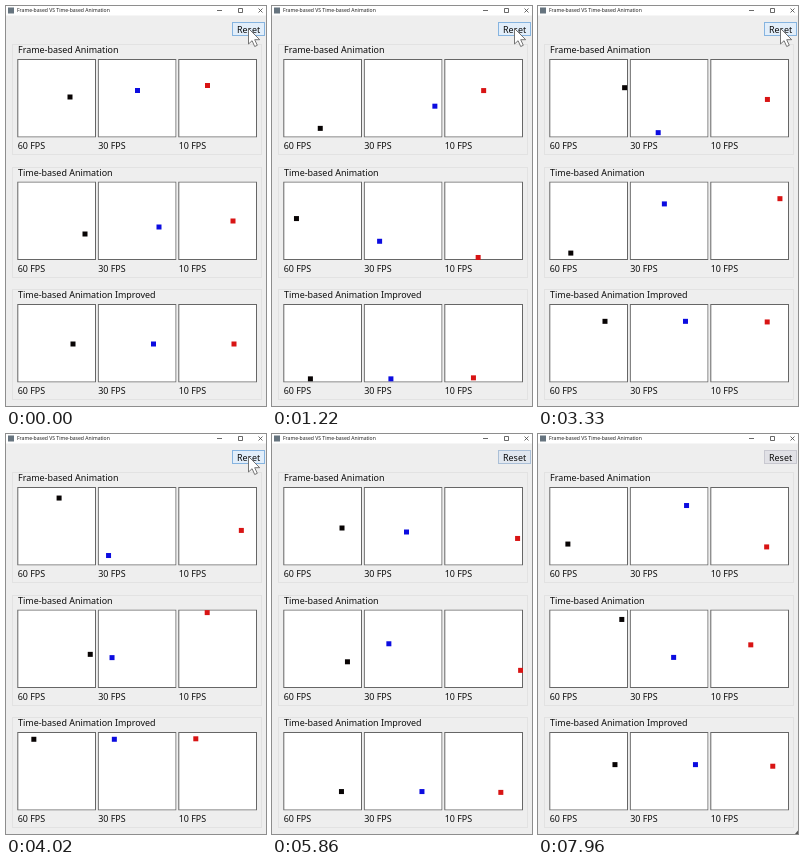
These frames come from a looping animation (260x400 px, 8 s). An HTML page:

```html
<!DOCTYPE html>
<html lang="en">
<head>
<meta charset="utf-8">
<title>Animation comparison</title>
<style>
  html, body { margin: 0; width: 100%; height: 100%; overflow: hidden; background: #eee; }
  svg { display: block; width: 260px; height: 400px; }
  text { font: 8.95px "Noto Sans", "Open Sans", sans-serif; fill: #0c0c0c; }
  .caption { font-size: 5.06px; fill: #222; }
</style>
</head>
<body>
<svg viewBox="0 0 260 400">
  <rect width="260" height="400" fill="#eee"/>
  <rect width="260" height="9.500" fill="#fff"/>
  <rect x="2" y="1.500" width="6" height="6" fill="#66747f"/>
  <text class="caption" x="11" y="6.400">Frame-based VS Time-based Animation</text>
  <path d="M211 4.500h5M232.500 2.500h4v4h-4zM252.500 2.500l4 4m0-4l-4 4" fill="none" stroke="#444" stroke-width=".8"/>
  <g id="panels"></g>
  <rect id="button" x="226.500" y="16.500" width="32" height="13"/>
  <text x="231" y="27.300">Reset</text>
  <path id="cursor" d="M242.500 22.500v15.500l3.600-3.300 2.600 5.800 2.600-1.200-2.600-5.600h5z"
        fill="#fff" stroke="#666" stroke-width=".9" stroke-linejoin="round"/>
  <path id="corner" d="M260 396.500v3.500h-3z" fill="#555"/>
</svg>
<script>
const LOOP = 8000, REFRESH = 77.25, LEAD = 20, SPAN = 73;
const RATES = [60, 30, 10], COLORS = ['#080404', '#0c0ce0', '#d81414'];

// Squares start at x, y and move at vx, vy pixels per second.
const perFrame = (x, y, fps) => ({ x, y, vx: .846 * fps, vy: .423 * fps });
const synced = { x: 52.5, y: 37.5, vx: 56.3, vy: 28.2 };
const ROWS = [
  { title: 'Frame-based Animation',
    squares: [perFrame(49.5, 35.5, 60), perFrame(36.5, 29, 30), perFrame(26, 24, 10)] },
  { title: 'Time-based Animation',
    squares: [
      { x: 64.5, y: 50, vx: 74, vy: 49.7 },
      { x: 58, y: 43, vx: 61, vy: 37 },
      { x: 51.5, y: 37, vx: 58.2, vy: 30.4, overshoot: 3 }] },
  { title: 'Time-based Animation Improved', squares: [synced, synced, synced] }
];

const byId = id => document.getElementById(id);
const clamp = v => Math.max(0, Math.min(1, v));

function add(parent, tag, attrs, text = '') {
  const el = document.createElementNS('http://www.w3.org/2000/svg', tag);
  for (const name in attrs) el.setAttribute(name, attrs[name]);
  el.textContent = text;
  return parent.appendChild(el);
}

function bounce(path, overshoot) {
  const span = SPAN + 2 * overshoot, p = (path + overshoot) % (2 * span);
  return Math.min(p, 2 * span - p) - overshoot;
}

const movers = [];
ROWS.forEach(({ title, squares }, row) => {
  const top = 53 + 122.5 * row, panel = byId('panels');
  add(panel, 'rect', { x: 6.5, y: Math.round(top) - 14.5, width: 249, height: 110, fill: 'none', stroke: '#e2e2e2' });
  add(panel, 'text', { x: 12, y: top - 5.8 }, title);
  squares.forEach((square, col) => {
    const left = 12 + 80.5 * col;
    add(panel, 'text', { x: left - .3, y: top + 90.2 }, RATES[col] + ' FPS');
    const box = add(panel, 'svg', { x: left - 1, y: top, width: 79, height: 78.5 });
    add(box, 'rect', { x: .8, y: .5, width: 77.7, height: 77.5, fill: '#fff', stroke: '#666' });
    const el = add(box, 'rect', { width: 5, height: 5, fill: COLORS[col] });
    movers.push({ el, fps: RATES[col], ...square });
  });
});

function mix(from, to, k) {
  return `rgb(${from.map((v, i) => Math.round(v + (to[i] - v) * k))})`;
}

function draw(t) {
  const now = Math.floor((t + LEAD) / REFRESH) * REFRESH;
  for (const { el, fps, x, y, vx, vy, overshoot = 0 } of movers) {
    // The slow column visibly holds between its own ticks.
    const seconds = fps === 10 ? Math.floor((now + 30) / 100) / 10 : now / 1000;
    el.setAttribute('x', 1 + bounce(x + vx * seconds, overshoot));
    el.setAttribute('y', bounce(y + vy * seconds, overshoot));
  }
  const leave = clamp((now - 5400) / 300), fade = clamp((now - 5600) / 500);
  byId('cursor').setAttribute('transform', `translate(${22 * leave * leave} ${4 * leave})`);
  byId('button').setAttribute('fill', mix([226, 238, 250], [225, 225, 230], fade));
  byId('button').setAttribute('stroke', mix([134, 180, 224], [200, 200, 208], fade));
  byId('corner').setAttribute('visibility', now > 7900 ? 'visible' : 'hidden');
}

const start = performance.now();
function tick() {
  draw((performance.now() - start) % LOOP);
  requestAnimationFrame(tick);
}
tick();
</script>
</body>
</html>
```
